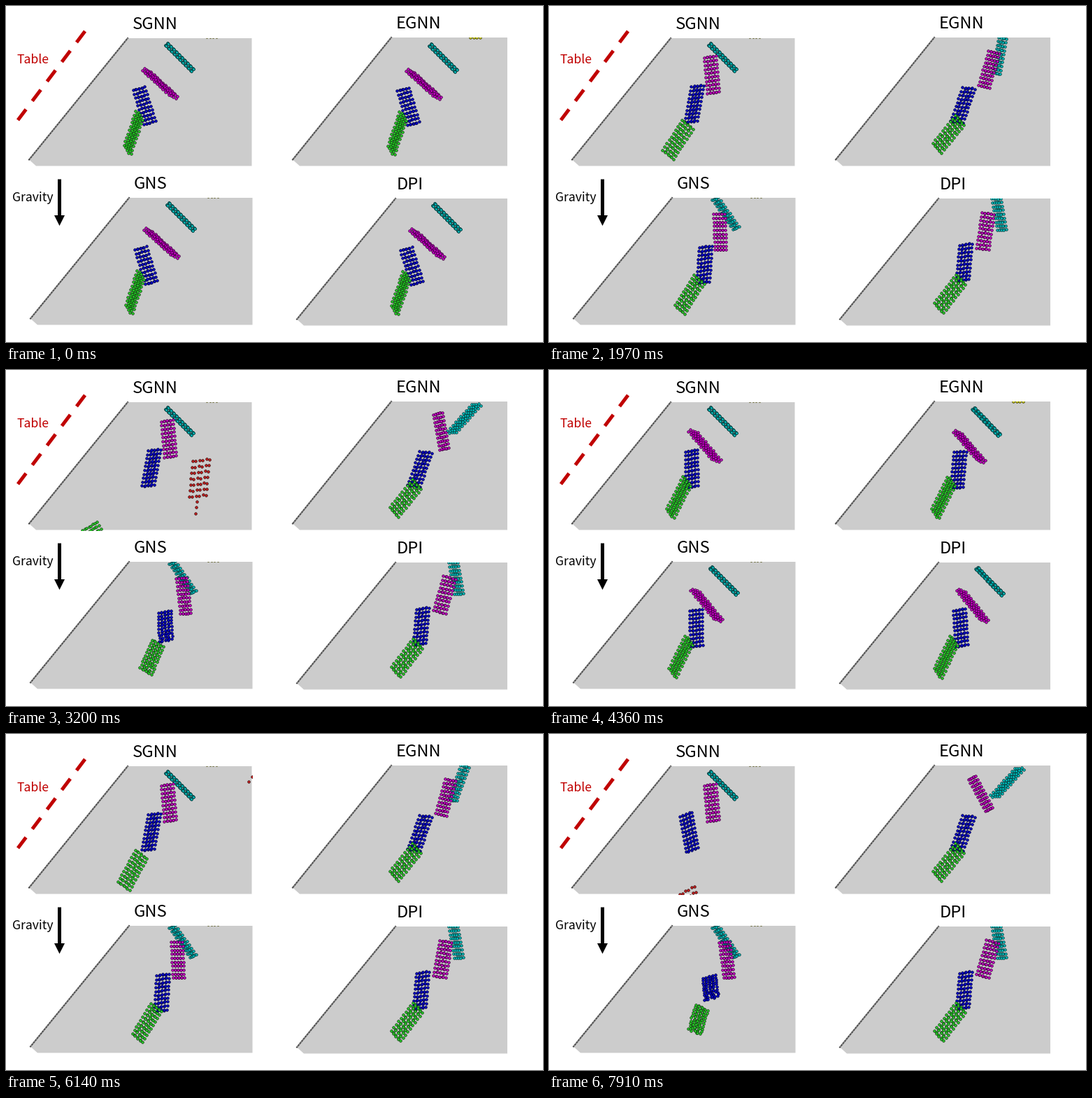
Animation of 768x480 px, one loop 7980 ms. Source, as a matplotlib script:

```python
import numpy as np
import matplotlib.pyplot as plt
from matplotlib.animation import FuncAnimation
from matplotlib.colors import to_rgb
from matplotlib.patches import Polygon, Rectangle

W, H, DPI = 768, 480, 100
STEP, FRAMES = 70, 114
RUN = FRAMES // 2  # the simulation plays twice per loop
END = 3.95
PX = 72 / DPI
LENGTH, DEPTH = 51, 4

COLORS = dict(cyan="#00bebe", magenta="#c800c8", blue="#0000d2",
              green="#28d228", red="#c81e1e", yellow="#c8c800")

# Poses: centre x, y, tilt of the long axis, turn of the rows, row width
START = dict(cyan=(248, 73, 45, 45, 2),
             magenta=(220, 110.5, 48, 27, 11),
             blue=(197, 142.5, 19, -17, 13.5),
             green=(181.5, 180.5, -18, 61, 12.5),
             red=(398, -3, -40, 30, 20),
             yellow=(294, 44.4, 0, 0, 14))
# Acceleration of each block while it comes to rest
POWER = dict(cyan=2.5, magenta=1.5, blue=1, green=1)

fig = plt.figure(figsize=(W / DPI, H / DPI), dpi=DPI, facecolor="white")
ax = fig.add_axes([0, 0, 1, 1])
ax.set_xlim(0, W)
ax.set_ylim(H, 0)
ax.axis("off")


def label(x, y, text, size, color="black", ha="center"):
    ax.text(x, y, text, fontsize=size * PX, color=color, ha=ha,
            va="baseline", family="Noto Sans CJK JP")


def lattice(*shape):
    axes = [(np.arange(n) - (n - 1) / 2) / max(n - 1, 1) for n in shape]
    return np.stack(np.meshgrid(*axes, indexing="ij"), -1).reshape(-1, 3)


class Panel:
    def __init__(self, name, offset, left, top, right, bottom, title_x):
        self.offset = np.array(offset)
        corner, tip = (left + 141, top), (left, bottom - 9)
        ax.add_patch(Polygon([corner, (right, top), (right, bottom),
                              (left + 10, bottom), tip], fc="#cccccc", lw=0))
        xs, ys = zip(corner, tip)
        ax.plot(xs, ys, color="#404040", lw=2 * PX)
        ax.plot(xs, ys, color="#b4b4b4", lw=1 * PX, ls=(0, (2, 2)))
        self.clip = Rectangle((left, top), right - left, bottom - top,
                              transform=ax.transData)
        label(title_x, top - 12.7, name, 23.8)

    def block(self, color, *moves, shape=(10, 4, 2), tail=(), shrink=0):
        blocks.append(Block(self, color, moves, shape, tail, shrink))

    def settle(self, color, seconds, pose, *moves, **style):
        self.block(color, (0, seconds, POWER[color], pose), *moves, **style)


class Block:
    """A lattice of dots that eases from its start through a chain of moves."""

    def __init__(self, panel, color, moves, shape, tail, shrink):
        self.offset, self.moves, self.shrink = panel.offset, moves, shrink
        self.start = np.array(START[color], float)
        self.grid = lattice(*shape)
        if tail:
            self.grid = np.vstack([self.grid, [(a, 0, 0) for a in tail]])
        noise = np.random.default_rng(4).normal(size=(len(self.grid), 2))
        self.noise = 4 * shrink * noise * (self.grid[:, :1] + .5) ** 2
        edge = np.array(to_rgb(COLORS[color])) * .25
        self.dots = ax.scatter([], [], s=(3.6 * PX) ** 2, color=COLORS[color],
                               edgecolors=[edge], linewidths=.7 * PX, zorder=3)
        self.dots.set_clip_path(panel.clip)

    def pose(self, now):
        pose = self.start
        for begin, end, power, goal in self.moves:
            u = np.clip((now - begin) / (end - begin), 0, 1) ** power
            pose = pose + (np.array(goal) - pose) * u
        return pose

    def draw(self, now):
        x, y, tilt, turn, width = self.pose(now)
        tilt, turn = np.radians([tilt, turn])
        axes = np.array([
            (LENGTH * np.sin(tilt), LENGTH * np.cos(tilt)),
            (width * np.cos(turn), width * np.sin(turn)),
            (DEPTH * np.cos(tilt), -DEPTH * np.sin(tilt))])
        loose = np.clip((now - 2.4) / (END - 2.4), 0, 1)
        grid = self.grid.copy()
        grid[:, 0] -= (grid[:, 0] + .5) * self.shrink * loose
        self.dots.set_offsets(self.offset + (x, y) + grid @ axes
                              + self.noise * loose)


blocks = []
sgnn = Panel("SGNN", (0, 0), 33, 46, 351.5, 228.5, 213)
egnn = Panel("EGNN", (377, 1), 410, 45, 717, 228.5, 590)
gns = Panel("GNS", (2, 228), 35, 274, 352.5, 455.5, 206)
dpi = Panel("DPI", (382, 229), 416, 275, 717, 456.5, 577.5)

RED = "#c00000"
label(16, 82, "Table", 17.6, RED, "left")
label(9, 279, "Gravity", 17.6, ha="left")
ax.plot([113, 17], [36, 163], color=RED, lw=5 * PX, ls=(0, (4, 3)),
        dash_capstyle="butt")
ax.plot([76, 76], [247, 301], color="black", lw=5 * PX, solid_capstyle="butt")
ax.add_patch(Polygon([(69, 299), (84, 299), (76.5, 314)], fc="black", lw=0))

sgnn.block("yellow", shape=(1, 4, 1))
sgnn.block("cyan")
sgnn.settle("magenta", 1.2, (232.5, 98, 5, -9, 13))
sgnn.settle("blue", .6, (207.5, 139.5, -10, -9, 14),
            (3.2, END, 1, (200, 140, 10, -23, 15)))
sgnn.settle("green", 1, (190.5, 184, -41, 50, 16),
            (1.4, END, 2, (72, 309, 104, -114, 24)))
sgnn.block("red", (1.9, END, 1, (204, 248, 15, -30, 20)),
           shape=(7, 3, 2), tail=(.67, .83, 1))

egnn.block("yellow", (.5, 2.5, 1, (292, 40, 0, 0, 14)), shape=(1, 4, 1))
egnn.settle("cyan", 2.4, (278, 68, -42, -5, 10))
egnn.settle("magenta", 1.6, (252, 89.5, -16, 12, 12),
            (2.1, END, 1, (240, 84, 28, -30, 8)))
egnn.settle("blue", .6, (214.5, 140.5, -19, 4, 14))
egnn.settle("green", 1, (194, 182, -39, 50, 15))

gns.block("yellow", shape=(1, 4, 1))
gns.settle("cyan", 1.7, (250.5, 68, 35, -14, 6))
gns.settle("magenta", 1.2, (237.5, 95, 0, 2, 13),
           (1.4, 3.2, 1, (252, 94.5, 7, -3, 11)))
gns.settle("blue", .6, (214.5, 139.5, -9, -4, 14),
           (.8, END, 1, (229, 144, 5, -17, 15)), shrink=.4)
gns.settle("green", 1, (193.5, 182.5, -40, 49, 15),
           (1, END, 1, (208.5, 187, -18, 28, 15)), shrink=.3)

dpi.settle("cyan", 2, (261, 65.5, 11, 0, 9))
dpi.settle("magenta", 1.2, (239.5, 93, -3, 5, 13),
           (1.4, 2.8, 1, (245, 92, -16, 13, 14)))
dpi.settle("blue", .6, (211.5, 137, -5, -9, 14))
dpi.settle("green", 1, (191, 182, -38, 50, 16))


def draw(i):
    now = (i % RUN + .5) * STEP / 1000
    for block in blocks:
        block.draw(now)
    return [block.dots for block in blocks]


anim = FuncAnimation(fig, draw, frames=FRAMES, interval=STEP, repeat=True)
plt.show()
```
